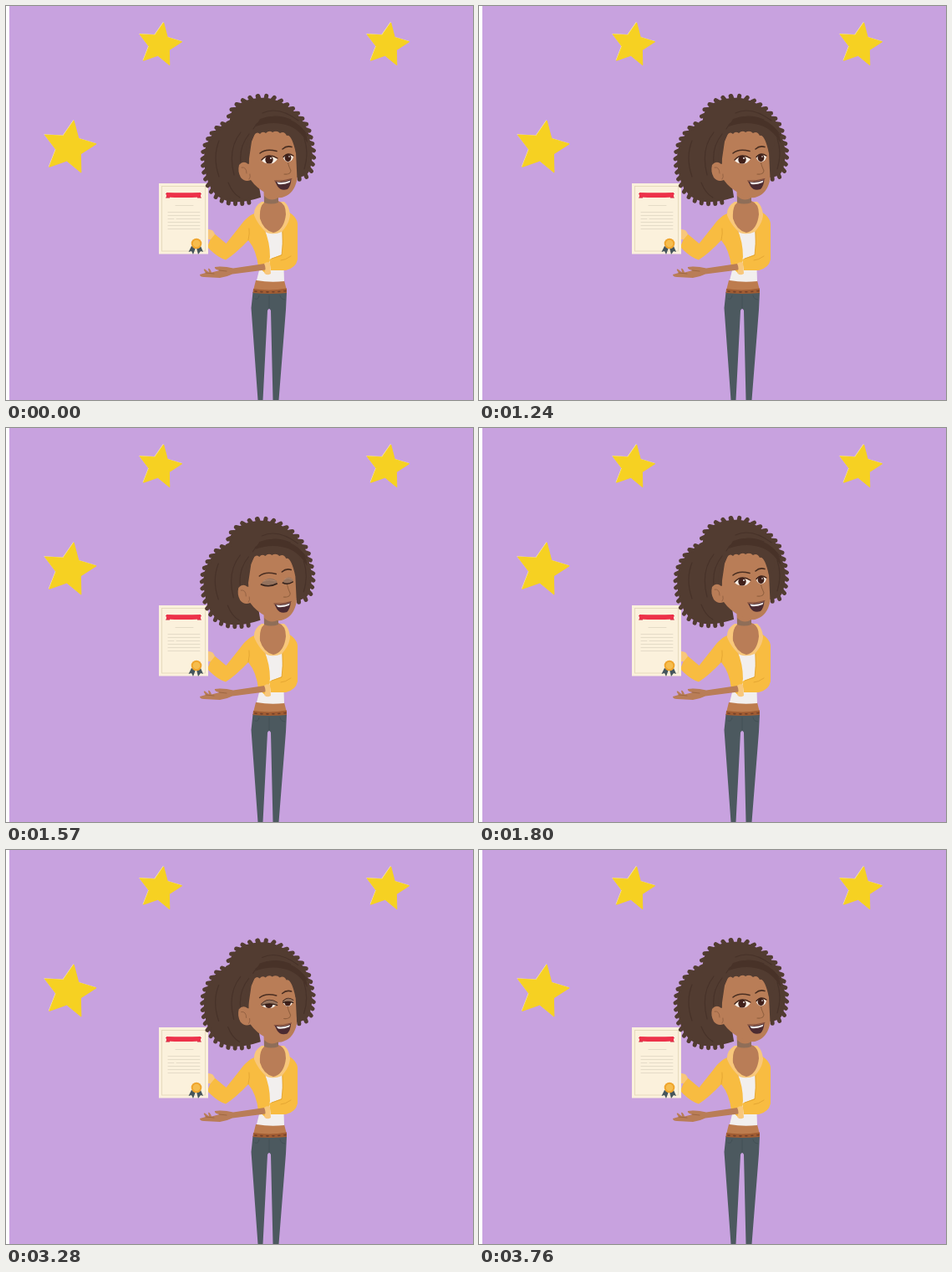
These frames come from a looping animation (559 by 471 pixels, 3.91 s). An HTML page:

```html
<!DOCTYPE html>
<html lang="en">
<head>
<meta charset="utf-8">
<title>Certificate presentation</title>
<style>
html, body { margin: 0; width: 100%; height: 100%; overflow: hidden; background: #c8a2df; }
svg { display: block; width: 559px; height: 471px; }
.line { fill: none; stroke-linecap: round; stroke-linejoin: round; }
.skin { fill: #b97d57; }
.coat { fill: #f8bc41; }
.trim { fill: #f8c77b; }
</style>
</head>
<body>
<svg viewBox="0 0 559 471">
  <rect width="559" height="471" fill="#c8a2df"/>
  <rect width="4" height="471" fill="#fff"/>
  <g id="stars" stroke-linejoin="round"></g>

  <!-- legs and waist -->
  <path fill="#4c595f" d="M295.500 342H336L335 363L326.500 471H319.500L317 364Q315 360 313 364L307.500 471H301.500L293.500 361Z"/>
  <path class="line" stroke="#414e54" stroke-width=".8" d="M315 346V361M298 350q4 2 5-4M328 346q1 5 6 5"/>
  <path fill="#bd7c4e" d="M299 328H333L336 340H296Z"/>
  <path fill="#a15c32" d="M296 338Q316 341 336 337.500V343Q316 345 295.500 343Z"/>
  <path class="line" stroke="#71402a" stroke-width="1.600" stroke-dasharray="2 5" d="M298 341Q316 343 335 340.500"/>

  <!-- torso -->
  <path fill="#f2efee" d="M312 264H331L333 329Q316 331 300 328L303 316Z"/>
  <path class="coat" d="M303 246Q290 249 281 262L263.500 284L248 271L241 288Q252 300 263 303.500Q275 296 290 280Q300 292 302 312L312 321L316 300Q316 282 309 266Z"/>
  <path class="coat" d="M332 243Q348 250 349 260V303Q347 313 335 316H317L315 303L330 297Q332 280 330 265Z"/>
  <path class="trim" d="M306 234Q296 240 297 250Q301 261 312 271Q321 274 330 270Q340 259 340 249Q339 239 333 234Z"/>
  <path class="skin" d="M308 208H326V233Q335 236 335 249Q333 268 320 271Q308 268 304 254Q303 240 309 235Z"/>
  <path fill="#8f6e58" d="M309 227Q317 235 326 229V235Q317 238 309 235Z"/>
  <path class="line" stroke="#e2a431" stroke-width=".9" d="M290 280Q292 271 291 266M331 270Q332 285 330 298L318 302M341 299Q334 304 329 304"/>
  <path class="skin" d="M313 307.500L272 313.500Q260 310.500 250 312Q249 315 256 316L246 318.500Q244 313 242 314L243 318.500L238 314.500Q235 314 239 319L232 321Q232 324 237 324L256 325Q264 324 271 320.500L314 315Z"/>
  <path class="line" stroke="#97623e" stroke-width=".8" d="M255 316L264 317M239 319L249 320"/>
  <path class="trim" d="M309 308Q312 305 316 307L317 320Q312 323 309 319Q312 314 309 308Z"/>

  <!-- certificate -->
  <path class="trim" d="M241 267Q248 266 250 273L245 279H241Z"/>
  <rect x="183" y="212" width="59" height="84.500" fill="#fbf1dc"/>
  <rect x="186.500" y="215.500" width="52" height="77.500" fill="none" stroke="#e4d8b9" stroke-width=".9"/>
  <path fill="#c92640" d="M191 224H196V229.500H191L192.500 227ZM229 224H234L232.500 227L234 229.500H229Z"/>
  <path fill="#ed3149" d="M192 223Q212 223.500 233 223V228.500Q212 229.500 192 228.500Z"/>
  <path class="line" stroke="#e4dbc7" d="M203 238.500H224M194 246.500H232M194 250.500H232M194 254.500H201M204 254.500H232M194 258.500H232M194 262.500H232M194 266.500H232"/>
  <path fill="#45555c" d="M222 287L218.500 294L222 293L224 297L227 289ZM233 287L236 294L233 293L230 297L228 289Z"/>
  <circle cx="228" cy="284" r="6.300" fill="#efa52d"/>
  <circle cx="228" cy="284" r="4.300" fill="#f6bd4d"/>

  <!-- head -->
  <g id="head">
    <g fill="#523c31" stroke="#523c31">
      <path id="mane" stroke-width="2" d="M302 111Q287 112 277 120Q268 127 269 139Q252 145 246 157Q238 168 238 183Q239 204 246 217Q253 229 265 232Q280 236 304 228L296 180L346 175L349 204Q363 203 364 190Q368 175 363 162Q361 147 355 139Q346 126 334 119Q319 109 302 111Z"/>
      <path id="locks" class="line" stroke-width="5"/>
    </g>
    <path class="skin" d="M299 150Q319 143 338 151Q347 160 347 175L348.500 207Q345 224 333 228Q325 232 312 224Q300 218 293 208Q286 211 281 205Q277 198 279 190Q284 184 290 189L294 162Z"/>
    <path class="line" stroke="#966344" stroke-width="1" d="M282 193Q288 192 288 200M291 207Q293 205 292 201"/>
    <path fill="#523c31" d="M291 189Q289 166 298 153Q301 150 304 153Q307 149 311 152Q315 148 319 151Q324 148 328 152Q333 149 336 155Q342 153 347 176Q357 169 352 152Q345 137 327 136Q306 131 294 146Q287 161 286 186Z"/>
    <path class="line" stroke="#473229" stroke-width="1.200" d="M296 147Q304 133 324 134Q349 136 361 155M299 142Q316 126 341 136M307 128Q326 119 350 137M281 151Q265 171 273 202M255 161Q247 181 255 204M291 153Q279 168 281 187M266 211Q271 224 280 229M357 158Q363 176 357 195"/>
    <path fill="#483228" d="M304 135Q325 127 346 139Q361 149 361 164Q350 144 330 141Q316 138 299 144Z"/>
    <path class="line" stroke="#4a2e21" stroke-width="1.600" d="M304 176Q311 170 324 173.500M331 171Q336 166.500 342 168.500"/>
    <path class="line" stroke="#91603f" stroke-width="1.100" d="M337 185Q338 191 341 197Q340 202 333 201"/>
    <g id="eyes">
      <path fill="#f8efe6" d="M306 185Q314 176 325 183Q321 189 315 188.500Q309 188 306 185ZM332 181.500Q336 175 344 180Q343 186 337 186.500Q333 185 332 181.500Z"/>
      <g fill="#40201a"><ellipse cx="315" cy="183.800" rx="4.700" ry="4.800"/><ellipse cx="337.500" cy="181.500" rx="3.900" ry="4.600"/></g>
      <g fill="#fff"><circle cx="317" cy="182" r=".9"/><circle cx="339" cy="180" r=".8"/></g>
      <path class="line" stroke="#3a211a" stroke-width="1.300" d="M306 184Q314 175 325 182M332 180.500Q337 174 344 179"/>
    </g>
    <g id="half">
      <path fill="#94725d" d="M306 184Q314 175 325 182V185Q315 182 306 185ZM332 181Q337 174 344 179V182Q338 180 332 182Z"/>
      <path class="line" stroke="#301b15" stroke-width="1.300" d="M307 185Q316 182 325 185M332 182Q338 180 344 182"/>
    </g>
    <g id="shut">
      <path fill="#94725d" d="M306 185Q315 174 325 182L325 186Q316 191 306 187ZM332 183Q338 174 344 180V183Q338 188 332 185Z"/>
      <path class="line" stroke="#35211a" stroke-width="1.500" d="M306 186Q316 190 325 185M332 184Q338 187 344 183"/>
      <path class="line" stroke="#b98c70" stroke-width=".8" d="M309 182Q316 179 323 182M334 180Q338 177 343 180"/>
    </g>
    <path fill="#4b2b31" d="M322 209.500Q333 211 341.500 207Q341 215 337 219Q329 221.500 325 215.500Z"/>
    <path fill="#efe8e5" d="M324 210.500Q333 212 340.500 208.500L339.500 211Q332 214 326 213Z"/>
    <path class="line" stroke="#7d4a3b" stroke-width=".9" d="M321.500 209Q332 209.500 342 206.500"/>
  </g>
</svg>
<script>
const $ = id => document.getElementById(id);
const LOOP = 3910;
// [start, lid], where lid is 0 open, 1 half, 2 shut
const lids = [
  [0, 0], [1410, 1], [1480, 2], [1710, 1], [1800, 0],
  [3280, 1], [3360, 2], [3590, 1], [3670, 0]
];

function starPath(cx, cy, r, tilt) {
  let d = '';
  for (let i = 0; i < 10; i++) {
    const a = (i * 36 + tilt - 90) * Math.PI / 180;
    const q = i % 2 ? r * 0.48 : r;
    d += (i ? 'L' : 'M') + (cx + q * Math.cos(a)).toFixed(1) + ' ' + (cy + q * Math.sin(a)).toFixed(1);
  }
  return d + 'Z';
}

const stars = [[184, 46.5, 27.5], [456, 46.5, 27.5], [75.5, 169.5, 33.5]];
$('stars').innerHTML = stars.map(([x, y, r]) =>
  `<path d="${starPath(x - .6, y - .6, r, 10)}" fill="#fbeaa0"/>` +
  `<path d="${starPath(x, y, r - .6, 10)}" fill="#f6d122" stroke="#f6d122"/>`
).join('');

// short curls around the hair, pointing outward and drooping
function curls() {
  const mane = $('mane'), size = mane.getTotalLength();
  let d = '';
  for (let s = 0; s < size; s += 8) {
    const p = mane.getPointAtLength(s), q = mane.getPointAtLength(s + 1);
    if (p.x > 292 && p.x < 350 && p.y > 170) continue;
    const x = p.y - q.y, y = q.x - p.x + 0.7, k = 3.5 / Math.hypot(x, y);
    d += `M${p.x} ${p.y}l${x * k} ${y * k}`;
  }
  return d;
}
$('locks').setAttribute('d', curls());

function pose(ms) {
  let lid = 0;
  for (const [start, value] of lids) if (ms >= start) lid = value;
  $('eyes').style.display = lid < 2 ? '' : 'none';
  $('half').style.display = lid === 1 ? '' : 'none';
  $('shut').style.display = lid === 2 ? '' : 'none';
  $('head').setAttribute('transform', `translate(${-0.35 * lid} ${0.5 * lid})`);
}

const begin = performance.now();
function tick() {
  pose((performance.now() - begin) % LOOP);
  requestAnimationFrame(tick);
}
pose(0);
requestAnimationFrame(tick);
</script>
</body>
</html>
```
